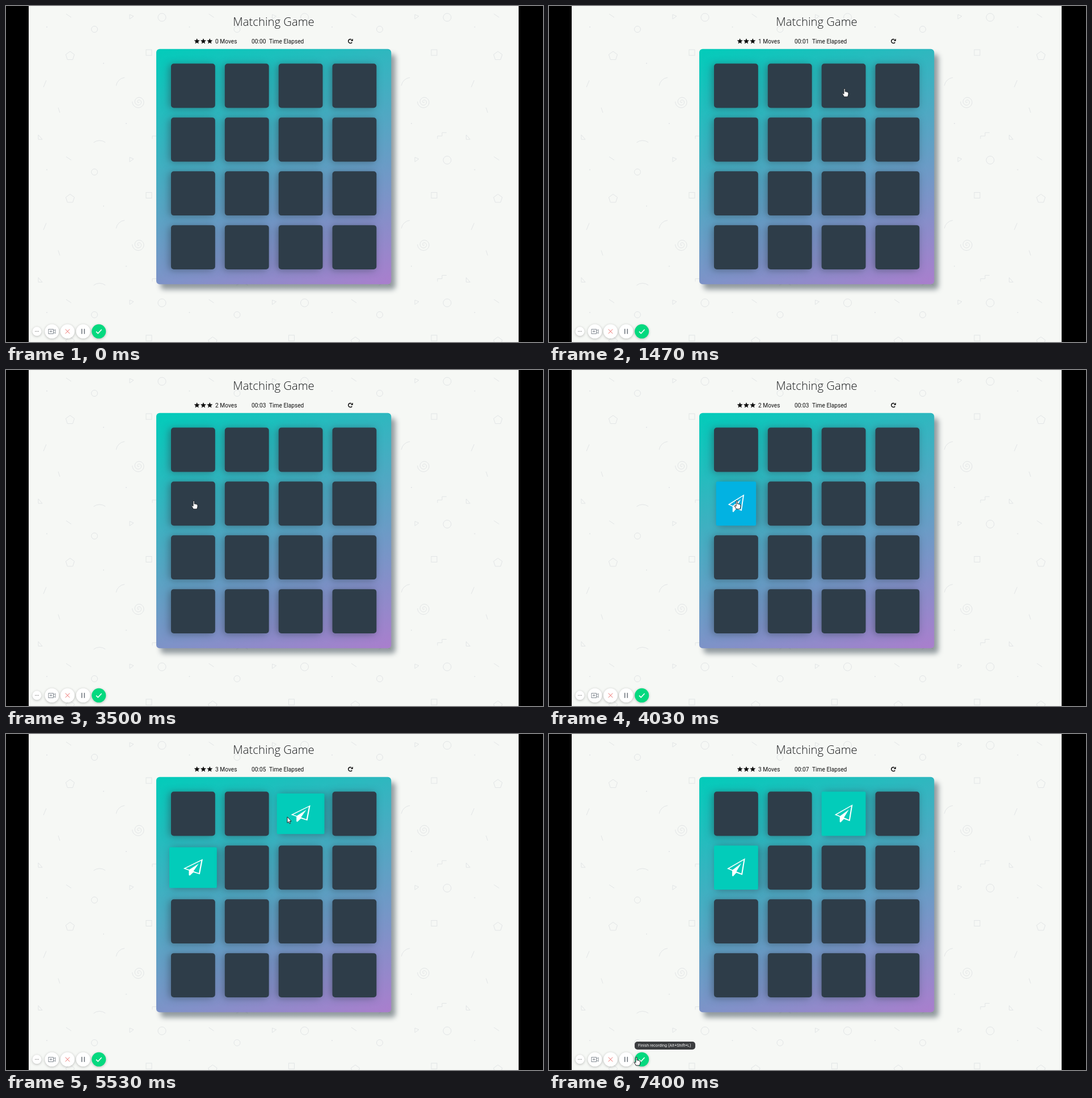
Write an HTML page with a canvas that moves like this. It is 947 px wide and 592 px high and loops after 7430 ms.

```html
<!DOCTYPE html>
<html lang="en">
<head>
<meta charset="utf-8">
<title>Matching Game</title>
<style>
html, body { margin: 0; width: 100%; height: 100%; overflow: hidden; background: #000; }
canvas { display: block; }
</style>
</head>
<body>
<canvas id="stage" width="947" height="592"></canvas>
<script>
const W = 947, H = 592, LOOP = 7430, TAU = Math.PI * 2;
const FLIP = 500, BAND = 1000, TIMER_START = 100;
const LEFT = 291, TOP = 101.6, PITCH = 94.85, SIZE = 77.8, TILE = 251.5;
const DARK = [46, 61, 73], BLUE = [2, 179, 228], WRONG = [196, 112, 62], TEAL = [2, 204, 186];
const ctx = document.getElementById('stage').getContext('2d');

// Pointer stops: time, x, y. A stop on a closed card clicks it.
const stops = [
  [100, 331, 148], [450, 425, 148], [1560, 521, 145], [2200, 624, 146], [3600, 331, 230],
  [4960, 531, 148], [5500, 496, 146], [6500, 290, 465], [7250, 154, 569]
];
const faces = ['diamond', 'bolt', 'plane', 'bike', 'plane'];
const cards = Array.from({ length: 16 }, (_, i) => ({ face: faces[i], steps: [], band: Infinity }));
const moveTimes = [];

const clamp = v => Math.max(0, Math.min(1, v));
const mix = (a, b, p) => a + (b - a) * p;
const smooth = p => p * p * (3 - 2 * p);

// CSS "ease": cubic-bezier(.25, .1, .25, 1)
function ease(x) {
  if (x <= 0 || x >= 1) return clamp(x);
  let lo = 0, hi = 1, u = .5;
  for (let i = 0; i < 20; i++) {
    u = (lo + hi) / 2;
    if (.75 * u * (1 - u) + u * u * u < x) lo = u; else hi = u;
  }
  return .3 * u * (1 - u) ** 2 + 3 * u * u * (1 - u) + u ** 3;
}

function cardAt(x, y) {
  const col = Math.floor((x - LEFT) / PITCH), row = Math.floor((y - TOP) / PITCH);
  const inside = col >= 0 && col < 4 && row >= 0 && row < 4 &&
    (x - LEFT) % PITCH < SIZE && (y - TOP) % PITCH < SIZE;
  return inside ? cards[row * 4 + col] : null;
}

function playGame() {
  let first = null;
  for (const [at, x, y] of stops) {
    const card = cardAt(x, y);
    if (!card || card.band < at) continue;
    if (!first) {
      first = card;
      card.steps.push({ at, color: BLUE, open: 1 });
      continue;
    }
    moveTimes.push(at);
    for (const c of [first, card]) {
      if (first.face === card.face) {
        c.band = at + 45;
        c.steps.push({ at: c.band, color: TEAL, open: 1 });
      } else {
        c.steps.push({ at, color: WRONG, open: 1 }, { at: at + 500, color: DARK, open: 0 });
      }
    }
    first = null;
  }
}

function poly(c, ...pts) {
  for (let i = 0; i < pts.length; i += 2) c[i ? 'lineTo' : 'moveTo'](pts[i], pts[i + 1]);
}
function line(c, ...pts) { c.beginPath(); poly(c, ...pts); c.stroke(); }
function shape(c, ...pts) { c.beginPath(); poly(c, ...pts); c.closePath(); c.stroke(); }
function blob(c, ...pts) { c.beginPath(); poly(c, ...pts); c.fill(); }
function arc(c, x, y, r, a = 0, b = TAU) { c.beginPath(); c.arc(x, y, r, a, b); c.stroke(); }
function dot(c, x, y, r) { c.beginPath(); c.arc(x, y, r, 0, TAU); c.fill(); }
function box(c, x, y, w, h, r) { c.beginPath(); c.roundRect(x, y, w, h, r); c.fill(); }
function polar(x, y, n, radius) {
  return Array.from({ length: n }, (_, i) => {
    const a = i * TAU / n - TAU / 4;
    return [x + radius(i) * Math.cos(a), y + radius(i) * Math.sin(a)];
  }).flat();
}
function shadow(c, color, x, y, blur) {
  c.shadowColor = color;
  c.shadowOffsetX = x;
  c.shadowOffsetY = y;
  c.shadowBlur = blur;
}
function text(c, s, x, y, font, color) {
  c.font = font;
  c.fillStyle = color;
  c.fillText(s, x, y);
}

function tile(c) {
  arc(c, 275, 20, 7);
  arc(c, 156, 41, 5.5);
  shape(c, ...polar(113, 88, 5, () => 8));
  shape(c, 218, 15, 225, 18, 218, 23);
  c.strokeRect(247, 77, 10, 10);
  line(c, 66, 143, 71, 131);
  line(c, 106, 14, 115, 20);
  line(c, 92, 179, 95, 188);
  arc(c, 211, 143, 17, 3.3, 4.6);
  arc(c, 165, 254, 17, 4.05, 5.35);
  shape(c, 57, 227, 57, 235, 64, 235);
  line(c, 258, 234, 258, 229, 266, 229, 266, 223, 274, 223);
  c.beginPath();
  for (let a = 0; a < 16; a += .25) c.lineTo(234 + a * .72 * Math.cos(a), 169 + a * .72 * Math.sin(a));
  c.stroke();
  dot(c, 72, 37, 1);
  dot(c, 172, 101, 1);
  dot(c, 212, 207, 1);
}

function toolbar(c) {
  const y = 573.3;
  for (let i = 0; i < 5; i++) {
    c.save();
    shadow(c, 'rgba(0,0,0,.25)', 0, 1, 4);
    c.fillStyle = i === 4 ? '#04d97f' : '#fff';
    dot(c, i ? 53.3 + i * 27.6 : 54.5, y, i ? 12.5 : 8);
    c.restore();
  }
  c.fillStyle = '#777';
  for (let i = -1; i < 2; i++) dot(c, 54.5 + i * 2.6, y, .7);
  c.strokeStyle = '#858c94';
  c.lineWidth = 1;
  c.strokeRect(75, 569.5, 8.5, 8);
  shape(c, 83.5, 572.5, 87, 570, 87, 577, 83.5, 574.5);
  line(c, 77, y, 81.5, y);
  line(c, 79.2, y - 2.2, 79.2, y + 2.2);
  c.strokeStyle = '#ee6a66';
  for (const s of [-1, 1]) line(c, 108.5 - 3.8, y - 3.8 * s, 108.5 + 3.8, y + 3.8 * s);
  c.strokeStyle = '#70777f';
  c.lineWidth = 1.6;
  for (const s of [-1, 1]) line(c, 136 + 2.3 * s, y - 4.5, 136 + 2.3 * s, y + 4.5);
  c.strokeStyle = '#fff';
  line(c, 159, 573.6, 162.2, 576.8, 168.6, 570);
}

function makeBackdrop() {
  const cv = document.createElement('canvas');
  cv.width = W;
  cv.height = H;
  const c = cv.getContext('2d');
  c.fillStyle = '#000';
  c.fillRect(0, 0, W, H);
  c.beginPath();
  c.rect(40, 0, 864, H);
  c.clip();
  c.fillStyle = '#f6f8f5';
  c.fillRect(40, 0, 864, H);
  c.strokeStyle = c.fillStyle = '#e2e5e6';
  for (let i = -1; i < 4; i++) for (let j = -1; j < 3; j++) {
    c.save();
    c.translate(i * TILE, j * TILE);
    tile(c);
    c.restore();
  }

  const g = c.createLinearGradient(381.3, 33.6, 562.7, 532.4);
  g.addColorStop(0, '#02ccba');
  g.addColorStop(1, '#aa7ecd');
  c.save();
  shadow(c, 'rgba(46,61,73,.5)', 7.5, 9.4, 10);
  c.fillStyle = g;
  box(c, 265, 75.7, 414.3, 414.5, 6);
  c.restore();

  c.textAlign = 'center';
  text(c, 'Matching Game', 472, 35, '300 20.3px "Open Sans", sans-serif', '#17191b');
  c.fillStyle = c.strokeStyle = '#111';
  for (let i = 0; i < 3; i++) blob(c, ...polar(336.7 + i * 11.3, 62.2, 10, k => k % 2 ? 2.4 : 5.3));
  c.lineWidth = 1.6;
  arc(c, 607.3, 62, 3.5, .6, 5.3);
  blob(c, 611.8, 57.5, 611.8, 61.8, 607.6, 61.8);
  toolbar(c);
  return cv;
}

const icons = {
  plane(c) {
    c.scale(1 / 56, 1 / 56);
    c.translate(-896, -925);
    c.beginPath();
    poly(c, 1785, 10, 1515, 1655, 921, 1436, 600, 1785, 512, 1740, 512, 1236, 5, 1025);
    c.closePath();
    poly(c, 1422, 1510, 1643, 187, 209, 1014, 545, 1151, 1408, 512, 930, 1309);
    c.fill('evenodd');
  },
  bike(c) {
    c.lineWidth = 2.3;
    for (const x of [-11, 11]) arc(c, x, 4, 7.3);
    shape(c, -11, 4, -5.5, -5.5, 6, -5.5, -1, 4);
    line(c, -1, 4, -7, -9, -10, -9);
    line(c, 11, 4, 5, -10, 9, -10);
  },
  diamond(c) {
    c.lineWidth = 2.2;
    shape(c, -9, -12, 9, -12, 16, -4, 0, 13, -16, -4);
    line(c, -16, -4, 16, -4);
  },
  bolt(c) {
    blob(c, -3, -15, 4, -15, 1, -6, 8, -8, -3, 15, 0, -1, -7, 1);
  }
};

function cardLook({ steps }, t) {
  let color = DARK, size = 0, turn = 0;
  for (const s of steps) {
    const x = clamp((t - s.at) / FLIP), p = ease(x);
    color = color.map((v, i) => mix(v, s.color[i], p));
    size = mix(size, s.open, p);
    turn = mix(turn, s.open, x);
  }
  return { color, size, turn };
}

// Rubber band: stretch, then a wobble that dies out
function rubber(u) {
  if (u < .3) return 1 + .25 * ease(u / .3);
  return 1 + .25 * ((1 - u) / .7) ** 2 * Math.cos(TAU * (u - .3) / .2);
}

function drawCard(card, i, t) {
  const { color, size, turn } = cardLook(card, t);
  const u = (t - card.band) / BAND, banding = u >= 0 && u < 1;
  const sx = banding ? rubber(u) : -Math.cos(Math.PI * turn);
  const sy = banding ? 2 - sx : 1;
  ctx.save();
  ctx.translate(LEFT + SIZE / 2 + i % 4 * PITCH, TOP + SIZE / 2 + Math.floor(i / 4) * PITCH);
  ctx.scale(sx, sy);
  ctx.save();
  shadow(ctx, 'rgba(46,61,73,.5)', 3.1 * sx, 1.3, 12.5);
  ctx.fillStyle = `rgb(${color.map(Math.round)})`;
  box(ctx, -SIZE / 2, -SIZE / 2, SIZE, SIZE, 5 - 2.5 * size);
  ctx.restore();
  if (size > .01) {
    ctx.scale(size, size);
    ctx.lineJoin = 'round';
    ctx.fillStyle = ctx.strokeStyle = '#fff';
    icons[card.face](ctx);
  }
  ctx.restore();
}

// Glide into each stop, arriving just before it is due
function pointerAt(t) {
  let [last, x, y] = stops[0];
  for (const [at, nx, ny] of stops) {
    const from = Math.max(last + 80, at - 700), to = at - 100;
    const p = smooth(clamp((t - from) / Math.max(1, to - from)));
    x = mix(x, nx, p);
    y = mix(y, ny, p);
    last = at;
  }
  return [x, y];
}

const hand = new Path2D('M-1 1Q0-.6 1.2 1V6Q2.2 5 3.2 6.3Q4.3 5.4 5.2 6.8Q6.5 6.3 7 8V11Q6.6 13 5.6 15H-.6Q-2 12-4 9.6Q-3.6 7.8-1 10Z');
const arrow = new Path2D('M0 0V10.5L2.4 8.4L4.1 12L5.7 11.3L4.1 7.8H7.3Z');

function drawPointer(t) {
  if (t < 50) return;
  const [x, y] = pointerAt(t), card = cardAt(x, y);
  const link = card ? t < card.band : y > 560 && x < 178;
  const path = link ? hand : arrow;
  ctx.save();
  ctx.translate(x, y);
  ctx.fillStyle = '#fff';
  ctx.strokeStyle = '#1b2024';
  ctx.lineJoin = 'round';
  ctx.fill(path);
  ctx.stroke(path);
  ctx.restore();
}

function drawTip(t) {
  ctx.globalAlpha = clamp((t - 7180) / 180);
  ctx.fillStyle = '#3c3e40';
  box(ctx, 151, 542, 107, 14, 5);
  text(ctx, 'Finish recording (Alt+Shift+L)', 157, 551.3, '7.2px Roboto, sans-serif', '#f2f2f2');
  ctx.globalAlpha = 1;
}

playGame();
const backdrop = makeBackdrop();

function draw(t) {
  ctx.drawImage(backdrop, 0, 0);
  const label = (s, x) => text(ctx, s, x, 65.5, '10.2px Roboto, sans-serif', '#111');
  label(moveTimes.filter(m => t >= m).length + ' Moves', 369);
  label('00:0' + Math.max(0, Math.floor((t - TIMER_START) / 1000)), 433);
  label('Time Elapsed', 464);
  cards.forEach((card, i) => drawCard(card, i, t));
  drawTip(t);
  drawPointer(t);
}

const start = performance.now();
function frame() {
  draw((performance.now() - start) % LOOP);
  requestAnimationFrame(frame);
}
frame();
</script>
</body>
</html>
```
